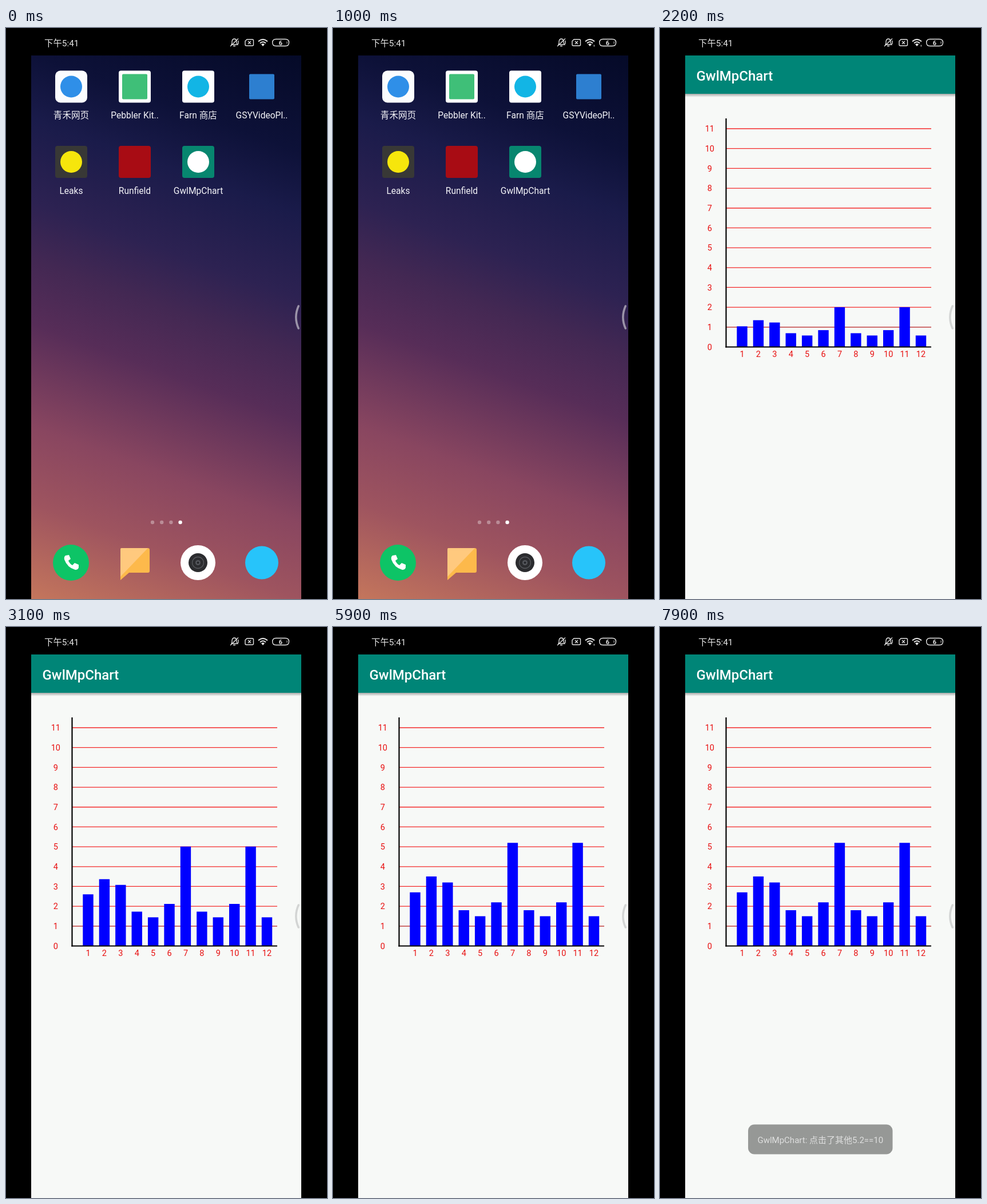
Write an HTML page with a canvas that moves like this. It is 561 by 998 pixels and loops after 8000 ms.

```html
<!DOCTYPE html>
<html lang="zh">
<head>
<meta charset="utf-8">
<style>
html, body { margin: 0; width: 561px; height: 998px; overflow: hidden; background: #000; }
canvas { display: block; }
</style>
</head>
<body>
<canvas id="stage" width="561" height="998"></canvas>
<script>
const c = document.getElementById('stage').getContext('2d');
const FONT = 'Roboto, "Noto Sans CJK SC", "Noto Sans CJK", sans-serif';
const PAPER = '#f7f9f7';
const LOOP = 8000;
const VALUES = [2.7, 3.5, 3.2, 1.8, 1.5, 2.2, 5.2, 1.8, 1.5, 2.2, 5.2, 1.5];
const BASE = 557.5, UNIT = 34.68;

const progress = (t, start, length) => Math.min(1, Math.max(0, (t - start) / length));
const easeOut = p => 1 - (1 - p) ** 3;
const easeInOut = p => (1 - Math.cos(p * Math.PI)) / 2;
const mix = (a, b, p) => a + (b - a) * p;

function box(x, y, w, h, color, r = 0) {
  c.fillStyle = color;
  c.beginPath();
  c.roundRect(x, y, w, h, r);
  c.fill();
}
function disc(x, y, r, color) {
  c.fillStyle = color;
  c.beginPath();
  c.arc(x, y, r, 0, 7);
  c.fill();
}
function path(d, color, width) {
  const p = new Path2D(d);
  if (width) {
    c.strokeStyle = color;
    c.lineWidth = width;
    c.stroke(p);
  } else {
    c.fillStyle = color;
    c.fill(p);
  }
}
function text(s, x, y, size, color, align = 'center', weight = 400) {
  c.font = `${weight} ${size}px ${FONT}`;
  c.textAlign = align;
  c.fillStyle = color;
  c.fillText(s, x, y);
}

function wallpaper() {
  const g = c.createLinearGradient(516, 48, 159, 1039.5);
  [[0, '#050a28'], [.15, '#0d1138'], [.25, '#1a1b4a'], [.38, '#2d2252'], [.47, '#432853'],
   [.57, '#572d58'], [.73, '#894660'], [.85, '#9e545f'], [1, '#c4765c']]
    .forEach(([at, color]) => g.addColorStop(at, color));
  c.fillStyle = g;
  c.fillRect(44, 48, 472, 950);
}

// Label, tile colour, plain mark colour, mark shape
const APPS = [
  ['青禾网页', '#fbfcfe', '#2f8fe8', 'disc'],
  ['Pebbler Kit..', '#fff', '#3fbf78', 'square'],
  ['Farn 商店', '#fff', '#12b5e5', 'disc'],
  ['GSYVideoPl..', null, '#2d7fd0', 'square'],
  ['Leaks', '#383836', '#f6e60c', 'disc'],
  ['Runfield', '#a80c14'],
  ['GwlMpChart', '#07866f', '#fff', 'disc']
];

function home() {
  wallpaper();
  APPS.forEach(([label, tile, mark, shape], i) => {
    const x = 114 + 111 * (i % 4), y = i < 4 ? 102.5 : 234;
    if (tile) box(x - 28, y - 28, 56, 56, tile, i ? 4 : 9);
    if (shape === 'disc') disc(x, y, 19, mark);
    if (shape === 'square') box(x - 22, y - 22, 44, 44, mark, 2);
    text(label, x, y + 55.5, 15.6, '#f4f4f8');
  });
  for (let i = 0; i < 4; i++)
    disc(256 + 16.2 * i, 864, 3.2, i === 3 ? '#fff' : 'rgba(255,255,255,.35)');

  disc(113.5, 934.5, 31.5, '#0dc466');
  path('M104 922 Q101 924 102 929 Q107 943 121 947 Q126 947 127 943 L127 938 L120 935 L116 939 Q111 936 109 931 L113 928 L110 921 Z', '#fff');
  path('M202 909 H248 Q251 909 251 912 V949 Q251 952 248 952 H215 L200 965 V912 Q200 909 202 909 Z', '#fdb94b');
  path('M202 909 H248 L200 959 V912 Q200 909 202 909 Z', '#ffc97e');
  disc(335.5, 934.5, 30.5, '#fff');
  disc(335.5, 934.5, 16.5, '#2b2c2f');
  path('M325.5 934.5 a10 10 0 1 0 20 0 a10 10 0 1 0 -20 0', '#55575b', 1.3);
  disc(335.5, 934.5, 4.5, '#53555a');
  disc(335.5, 934.5, 2, '#25262a');
  disc(447, 934.5, 29, '#27c4fa');
}

function chart(t) {
  box(44, 48, 472, 950, PAPER);
  const shade = c.createLinearGradient(0, 115, 0, 121);
  shade.addColorStop(0, 'rgba(0,0,0,.32)');
  shade.addColorStop(1, 'rgba(0,0,0,0)');
  box(44, 115, 472, 6, shade);
  box(44, 48, 472, 67, '#008577');
  text('GwlMpChart', 63.5, 91.5, 24, '#fff', 'left', 500);

  for (let n = 0; n < 12; n++) {
    const y = BASE - UNIT * n;
    if (n) box(115, y - .65, 359, 1.3, n === 1 ? '#b51c1c' : '#f42a2a');
    text(n, 86.8, y + 5.2, 14.5, '#e81010');
  }
  const grow = easeInOut(progress(t, 1348, 2000));
  VALUES.forEach((v, i) => {
    const x = 143.5 + 28.41 * i, h = v * UNIT * grow;
    box(x - 9.2, BASE - h, 18.4, h, '#00f');
    text(i + 1, x, 575.2, 14.5, '#e81010');
  });
  box(114.4, 158, 2.2, 400.4, '#000');
  box(114.4, BASE - .9, 359.6, 1.8, '#000');
}

function app(t) {
  const p = easeOut(progress(t, 1060, 280));
  if (p === 0) return;
  if (p === 1) chart(t);
  c.globalAlpha = 1 - progress(t, 1340, 240);
  box(mix(308, 44, p), mix(206, 48, p), mix(56, 472, p), mix(56, 950, p), PAPER, mix(6, 0, p));
  c.globalAlpha = 1;
}

function toast(t) {
  const enter = easeOut(progress(t, 6000, 300));
  c.globalAlpha = enter * (1 - progress(t, 7840, 200));
  const y = 869.5 + 28 * (1 - enter);
  box(154, y, 252.5, 52, '#6d6e6d', 11);
  text('GwlMpChart: 点击了其他5.2==10', 280.3, y + 32.3, 15, '#fff');
  c.globalAlpha = 1;
}

function statusBar(t) {
  const ink = '#e6e6e6';
  box(0, 0, 561, 48, '#000');
  text('下午5:41', 67, 32, 15.4, ink, 'left');
  path('M394 29 H405 L403 26 V23 Q402 19 399 19 Q396 19 395 23 V26 Z M397 31.5 H401 M392 32 L406 18.5 M406 22 V28', ink, 1.3);
  path('M421 20 H430.5 Q432.5 20 432.5 22 V29 Q432.5 31 430.5 31 H420 Q418 31 418 29 V23 Z M423 23 L428 28 M428 23 L423 28', ink, 1.4);
  path('M441 23.5 Q449 16.5 457 23.5 M444 26.5 Q449 22 454 26.5', ink, 2);
  path('M446 28.5 Q449 26 452 28.5 L449 32 Z', ink);
  if ((t > 900 && t < 2900) || (t > 4000 && t < 7500)) box(455.5, 29.5, 1.8, 3, '#999');
  path('M471 19.5 H488 Q494.5 19.5 494.5 25.5 Q494.5 31.5 488 31.5 H472 Q465.7 31.5 465.7 25.5 Q465.7 19.5 472 19.5', ink, 1.4);
  text('6', 479.8, 29.6, 11, ink, 'center', 700);
  box(490.5, 23.5, 1.2, 4, '#aaa');
}

function draw(now) {
  const t = now % LOOP;
  box(0, 0, 561, 998, '#000');
  home();
  app(t);
  toast(t);
  statusBar(t);
  c.lineCap = 'round';
  path('M511.2 486 Q502.5 505.5 511.2 525', t < 1200 ? '#9b93a8' : '#d3d5d4', 3.6);
  c.lineCap = 'butt';
  requestAnimationFrame(draw);
}
requestAnimationFrame(draw);
</script>
</body>
</html>
```
